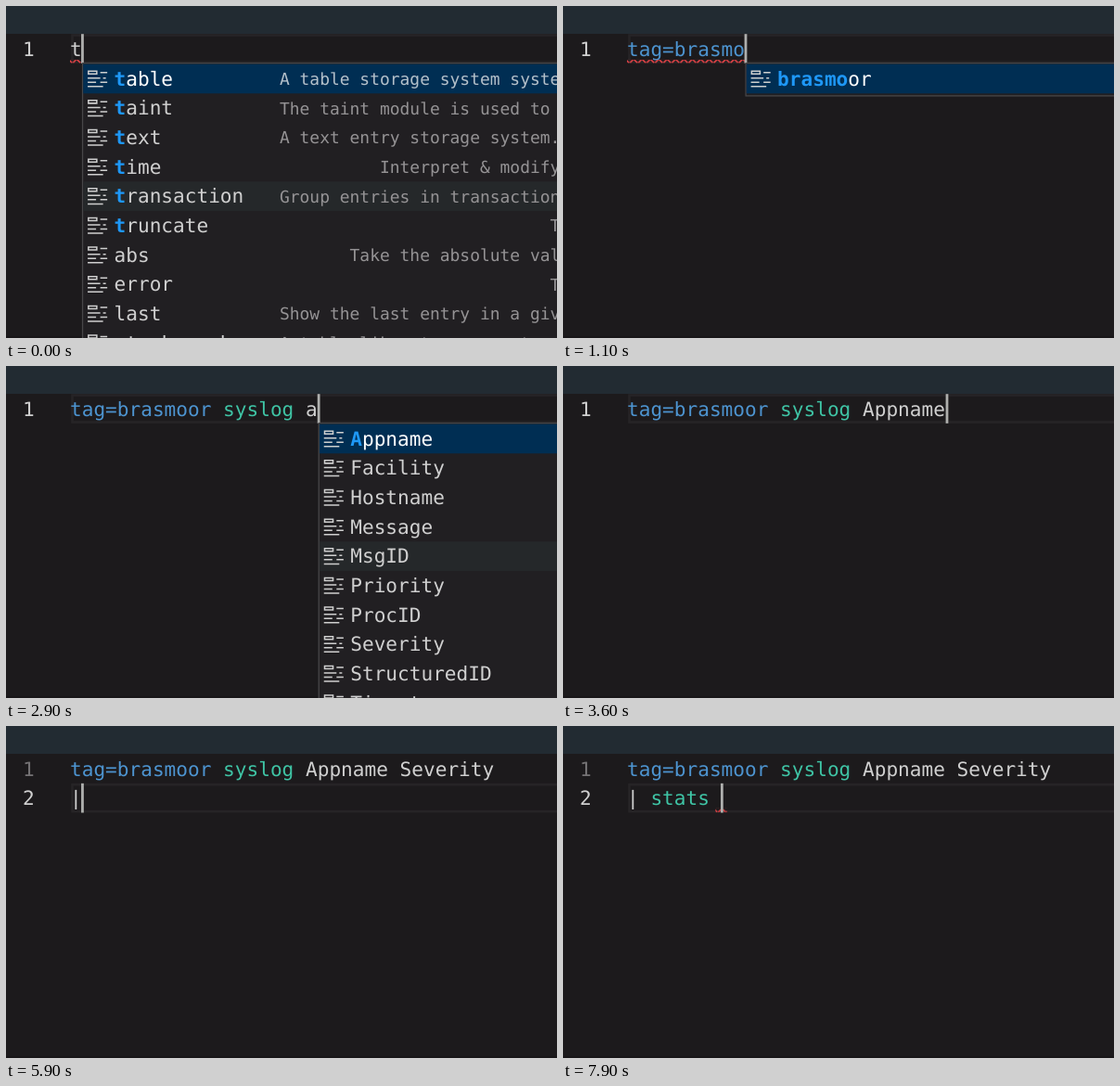
These frames come from a looping animation (594x358 px, 8 s). An HTML page:

```html
<!DOCTYPE html>
<html lang="en">
<head>
<meta charset="utf-8">
<title>Query editor</title>
<style>
html, body { margin: 0; width: 100%; height: 100%; overflow: hidden; background: #1c1a1c; }
svg { display: block; }
text { font: 21.1px "DejaVu Sans Mono", monospace; fill: #d0d0d0; white-space: pre; text-rendering: geometricPrecision; }
.tag { fill: #4d94d0; }
.mod { fill: #3fc4a5; }
.dim { fill: #747274; }
.hit { fill: #1e98f7; font-weight: bold; }
.info { font-size: 17.94px; fill: #959395; }
.on { fill: #fff; }
.on.info { fill: #b4c0ca; }
</style>
</head>
<body>
<svg width="594" height="358" viewBox="0 0 594 358">
  <defs>
    <pattern id="wave" width="6" height="3" patternUnits="userSpaceOnUse">
      <path fill="#f04448" d="M5.5 0 2.5 3H1.1L4.1 0zM4 0 6 2V.6L5.4 0zM0 2 1 3H2.4L0 .6z"/>
    </pattern>
    <path id="icon" fill="#cfcfcf" fill-rule="evenodd" d="M10 3h5v1h-5zM12 7h2v1h-2zM1 7h9v1H1zM1 13h11v1H1zM1 10h6v1H1zM10 10h5v1h-5zM1 2h7v3H1zM2 3v1h5V3z"/>
  </defs>
  <path fill="#222b32" d="M0 0h594v30H0z"/>
  <path fill="#171517" d="M0 356h594v2H0z"/>
  <g id="view"></g>
</svg>
<script>
// Widths are in stage pixels; the editor itself is drawn at ZOOM
const LOOP = 8000, ZOOM = 1.507, CH = 8.43 * ZOOM, INFO_CH = 10.8, LINE = 21 * ZOOM, LEFT = 69, TOP = 30.2;
const HOVER_Y = 205;

// Each row: name, indent of the description in characters, description
const lists = {
  start: `table,0,A table storage system system
taint,0,The taint module is used to track
text,0,A text entry storage system.
time,10,Interpret & modify times
transaction,0,Group entries in transactions
truncate,27,Truncate
abs,7,Take the absolute value
error,27,Throw
last,0,Show the last entry in a given set
stackgraph,0,A table like storage system`,
  tags: `brasmoor
raw,0,A raw entry storage system
regex,1,Extract data using regex
require,6,Drop entries lacking
unti
dump,4,Inject resource contents
gauge
wordcloud,20,Word
numbercard,19,Number
dns,0,Perform forward and reverse`,
  tag: `brasmoor`,
  modules: `syslog
fdg,0,A fdg storage system
split,3,Split a value
chart,0,A chart storage
table,0,A table storage
hex,0,A hex entry storage
raw,0,A raw entry storage
heatmap,0,A point map
pointmap,0,A point map
max`,
  module: `syslog`,
  fields: `Appname
Facility
Hostname
Message
MsgID
Priority
ProcID
Severity
StructuredID
Timestamp`,
  app: `Appname`,
  se: `Severity
StructuredID
StructuredData`,
  sev: `Severity`,
  stats: `stackgraph,0,A table like storage system
stats,1,Stats operations on enumerated
stddev,1,Stats operations on enumerated
strings,0,Find strings of at least a size
strip,23,Strip
sort
max,1,Stats operations on enumerated
min,1,Stats operations on enumerated
split,3,Split a value into parts`
};

const Q1 = 'tag=brasmoor ', Q2 = Q1 + 'syslog ', Q3 = Q2 + 'Appname ', Q4 = Q3 + 'Severity', Q5 = Q4 + '\n| ';

// time, text, open list, squiggle, cursor hidden
const steps = [
  [0, 't', 'start', 1], [100, 'ta', 'start', 1], [200, 'tag', 'start', 1], [300, 'tag=', '', 1],
  [400, 'tag=b', 'tags', 1], [500, 'tag=br', 'tags', 1], [600, 'tag=bra', 'tag', 1],
  [700, 'tag=bras', 'tag', 1], [900, 'tag=brasm', 'tag', 1], [1000, 'tag=brasmo', 'tag', 1],
  [1200, 'tag=brasmoo', 'tag', 1], [1300, 'tag=brasmoor', 'tag'], [1500, 'tag=brasmoor'], [1700, Q1],
  [1900, Q1 + 's', 'modules', 1], [2000, Q1 + 'sy', 'modules', 1], [2100, Q1 + 'sys', 'modules', 1, 1],
  [2200, Q1 + 'sysl', 'module', 1], [2300, Q1 + 'syslo', 'module', 1], [2400, Q1 + 'syslog', 'module'],
  [2600, Q2, 'fields'], [2900, Q2 + 'a', 'fields'], [3000, Q2 + 'ap', 'app'], [3100, Q2 + 'app', 'app'],
  [3400, Q2 + 'Appname'], [3900, Q3], [4100, Q3, 'fields'], [4700, Q3 + 's', 'se'], [4800, Q3 + 'se', 'se'],
  [5000, Q3 + 'sev', 'sev'], [5200, Q4], [5600, Q4 + '\n'], [5900, Q4 + '\n|'], [6200, Q5],
  [6500, Q5 + 's', 'stats', 1], [6600, Q5 + 'st', 'stats', 1], [6700, Q5 + 'sta', 'stats', 1],
  [6800, Q5 + 'stat', 'stats', 1], [6900, Q5 + 'stats', 'stats'], [7400, Q5 + 'stats'], [7700, Q5 + 'stats ', '', 1]
];

const esc = s => s.replace(/&/g, '&amp;');
const rect = (x, y, w, h, fill, extra = '') =>
  `<rect x="${x}" y="${y}" width="${w}" height="${h}" fill="${fill}" ${extra}/>`;
const text = (x, y, body, cls = '') => `<text x="${x}" y="${y}" class="${cls}">${body}</text>`;
const span = (cls, s) => `<tspan class="${cls}">${s}</tspan>`;

// Marks the letters matched by the longest fitting ending of the typed word
function mark(name, word) {
  for (let i = 0; i < word.length; i++) {
    const part = word.slice(i).toLowerCase();
    if (name[0].toLowerCase() !== part[0]) continue;
    let n = 0;
    const out = [...name].map(c => c.toLowerCase() === part[n] ? (n++, span('hit', c)) : c).join('');
    if (n === part.length) return out;
  }
  return name;
}

function colour(line, row) {
  let n = 0;
  return line.replace(/\S+/g, s => {
    const i = n++;
    if (i === 1) return span('mod', s);
    return !row && !i && s.includes('=') ? span('tag', s) : s;
  });
}

function popup(key, x, top, word) {
  const rows = lists[key].split('\n');
  let out = rect(x, top, 700, rows.length * LINE + 3.6, '#211f22', 'stroke="#474648" stroke-width="1.3"');
  rows.forEach((row, i) => {
    const [name, indent, info] = row.split(',');
    const y = top + 1 + i * LINE, on = i ? '' : 'on';
    if (!i) out += rect(x + .7, y, 700, LINE, '#002e53');
    else if (y <= HOVER_Y && HOVER_Y < y + LINE) out += rect(x + .7, y, 700, LINE, '#25282a');
    out += `<use href="#icon" transform="translate(${x + 4} ${y + 3.8}) scale(${ZOOM})"/>`;
    out += text(x + 34, y + 23.1, mark(name, word), on);
    if (info) out += text(x + 212.4 + indent * INFO_CH, y + 22.4, esc(info), 'info ' + on);
  });
  return out;
}

function draw([, content, list, squiggle, hidden]) {
  const lines = content.split('\n'), last = lines.length - 1, line = lines[last];
  const top = TOP + last * LINE, end = LEFT + line.length * CH;
  // The cursor snaps to the editor's own pixels
  const cursor = LEFT + Math.round(line.length * CH / ZOOM) * ZOOM;
  let out = rect(LEFT + 2.5, top + 1.3, 600, LINE - 2.6, 'none', 'stroke="#262426" stroke-width="2.6"');
  lines.forEach((s, i) => {
    const y = TOP + i * LINE + 23.3;
    out += text(18, y, i + 1, i < last ? 'dim' : '') + text(LEFT, y, colour(s, i));
  });
  if (squiggle) {
    const size = line.match(/\S*$/)[0].length;
    const from = size ? end - size * CH : end - CH / 2;
    out += `<g transform="translate(${from} ${top + 27}) scale(${ZOOM})">` +
      rect(0, 0, (size || 1) * CH / ZOOM, 3, 'url(#wave)') + '</g>';
  }
  if (!hidden) out += rect(cursor, top, 2.8, LINE, '#aeafad');
  if (list) out += popup(list, cursor + 1.5, top + LINE - .2, line.match(/\w*$/)[0]);
  return out;
}

const view = document.getElementById('view');
let shown;
function tick() {
  const t = performance.now() % LOOP;
  const step = steps.findLast(s => s[0] <= t);
  if (step !== shown) view.innerHTML = draw(shown = step);
  requestAnimationFrame(tick);
}
tick();
</script>
</body>
</html>
```
